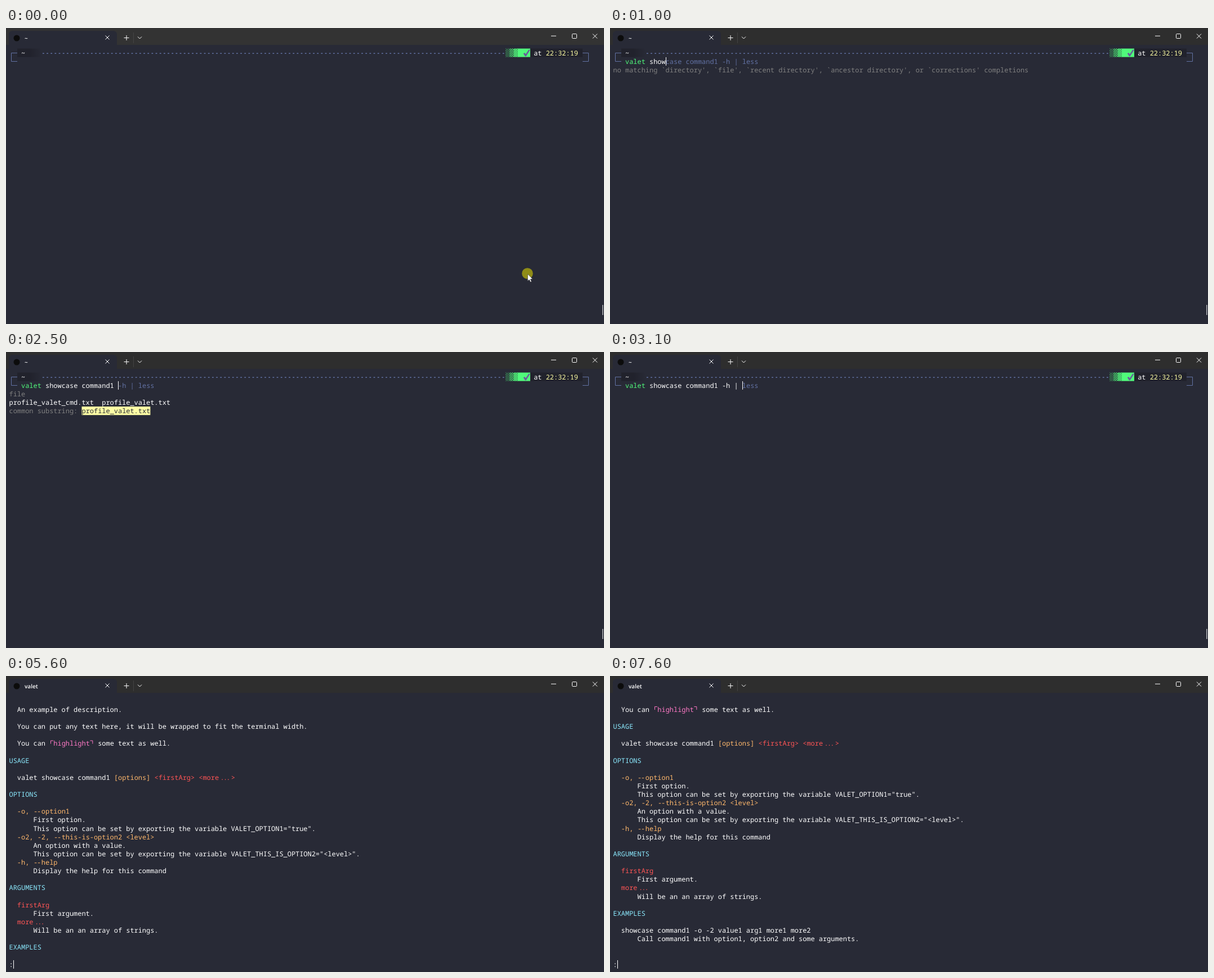
These frames come from a looping animation (1062 by 527 pixels, 8 s). An HTML page:

```html
<!DOCTYPE html>
<html lang="en">
<head>
<meta charset="utf-8">
<title>Terminal help pager</title>
<style>
html, body { margin: 0; width: 100%; height: 100%; overflow: hidden; background: #282a36; }
svg { display: block; width: 100%; height: 100%; }
text { white-space: pre; text-rendering: geometricPrecision; }
.mono { font: 11.945px "Noto Sans Mono", "DejaVu Sans Mono", monospace; }
.title { font: 600 10px "Open Sans", "Noto Sans", sans-serif; }
.icon { fill: none; stroke: #fff; stroke-width: 1; }
.frame { fill: none; stroke: #6272a4; stroke-width: 1; }
</style>
</head>
<body>
<svg viewBox="0 0 1062 527">
  <defs>
    <linearGradient id="fade">
      <stop offset="0" stop-color="#21222c"/>
      <stop offset="1" stop-color="#21222c" stop-opacity="0"/>
    </linearGradient>
    <pattern id="light" width="3.6" height="3.8" patternUnits="userSpaceOnUse">
      <path d="M0 0h1.3v1.3h-1.3zM1.8 1.9h1.3v1.3h-1.3z" fill="#50fa7b"/>
    </pattern>
    <pattern id="medium" width="3.6" height="3.8" patternUnits="userSpaceOnUse">
      <path d="M0 0h1.8v1.9h-1.8zM1.8 1.9h1.8v1.9h-1.8z" fill="#50fa7b"/>
    </pattern>
    <pattern id="dense" width="3.6" height="3.8" patternUnits="userSpaceOnUse">
      <path d="M0 0h3.6v3.8h-3.6z" fill="#50fa7b"/>
      <path d="M0 0h1.2v1.2h-1.2zM1.8 1.9h1.2v1.2h-1.2z" fill="#282a36"/>
    </pattern>
  </defs>

  <rect width="1062" height="527" fill="#282a36"/>
  <rect id="bar" width="1062" height="30"/>
  <path d="M5 30V12Q5 5 12 5H190Q197 5 197 12V30Z" fill="#282a36"/>
  <circle cx="19" cy="18" r="5.5" fill="#0c0c0c"/>
  <text id="title" class="title" x="33" y="21.5" fill="#fff"></text>
  <path class="icon" d="M176.5 13.5l7 7m0-7l-7 7M209.5 17.5h9m-4.5-4.5v9M234 15.5l3.5 3.5 3.5-3.5"/>
  <path class="icon" d="M968 14.2h9M1042 10.5l8 8m0-8l-8 8"/>
  <rect class="icon" x="1005.5" y="10.5" width="8" height="8" rx="1"/>
  <path d="M226.5 8v19" stroke="#444"/>

  <g id="shell">
    <path class="frame" d="M20 44.5H9.5V59.5H20M1024 44.5H1034.5V59.5H1024"/>
    <rect x="20" y="36.6" width="22" height="15.1" fill="#21222c"/>
    <rect x="42" y="36.6" width="22" height="15.1" fill="url(#fade)"/>
    <path d="M65 45.2H886" stroke="#6272a4" stroke-width="1.4" stroke-dasharray="2.7 4.467"/>
    <rect x="887" y="36.6" width="7.2" height="15.1" fill="url(#light)"/>
    <rect x="894.2" y="36.6" width="7.2" height="15.1" fill="url(#medium)"/>
    <rect x="901.4" y="36.6" width="7.2" height="15.1" fill="url(#dense)"/>
    <rect x="908.5" y="36.6" width="22.5" height="15.1" fill="#50fa7b"/>
    <path d="M918.8 45.4l2.2-1.4 2 2.4 5.2-7.6 2.8-.4-7.4 12-1.6.2z" fill="#6a5a9c"/>
    <rect x="931" y="36.6" width="93" height="15.1" fill="#21222c"/>
    <rect x="1059" y="493" width="1.5" height="18" fill="#b4b5ba"/>
    <g id="prompt" class="mono"></g>
  </g>
  <g id="screen" class="mono"></g>
  <rect id="caret" width="1" height="15" fill="#fff"/>
  <g id="mouse">
    <circle cx="926" cy="437" r="9.8" fill="#8f8c17"/>
    <path d="M926.5 438v12.5l2.8-2.6 2 4.4 2-.9-2-4.3h3.9z" fill="#fff" stroke="#222" stroke-width=".5"/>
  </g>
</svg>
<script>
const LOOP = 8000, CELL = 7.167, LINE = 15.13, LEFT = 5.5, TOP = 37;
const COLORS = {
  w: '#ffffff', c: '#8be9fd', o: '#ffb86c', r: '#ff5555', p: '#ff79c6',
  g: '#50fa7b', s: '#6272a4', d: '#808080', y: '#ffffa5', k: '#282a36'
};
const COMMAND = 'valet showcase command1 -h | less';
const NO_MATCH = ["^dno matching `directory', `file', `recent directory', `ancestor directory', or `corrections' completions"];
const FILES = ['^dfile', 'profile_valet_cmd.txt  profile_valet.txt', '^dcommon substring: ^kprofile_valet.txt'];
const ONE_FILE = ['^dfile', 'profile_valet_cmd.txt'];

// A caret and a letter switch the colour for the text that follows.
const HELP = `^cABOUT

  An example of description.

  You can put any text here, it will be wrapped to fit the terminal width.

  You can ^p⌜highlight⌝^w some text as well.

^cUSAGE

  valet showcase command1 ^o[options] ^r<firstArg> <more...>

^cOPTIONS

  ^o-o, --option1
      First option.
      This option can be set by exporting the variable VALET_OPTION1="true".
  ^o-o2, -2, --this-is-option2 <level>
      An option with a value.
      This option can be set by exporting the variable VALET_THIS_IS_OPTION2="<level>".
  ^o-h, --help
      Display the help for this command

^cARGUMENTS

  ^rfirstArg
      First argument.
  ^rmore...
      Will be an an array of strings.

^cEXAMPLES

  showcase command1 -o -2 value1 arg1 more1 more2
      Call command1 with option1, option2 and some arguments.`.split('\n');

const el = id => document.getElementById(id);
const colX = col => LEFT + col * CELL;
const rowY = row => TOP + row * LINE;
const escapeText = s => s.replace(/&/g, '&amp;').replace(/</g, '&lt;');

function glyphs(text, col, row, color) {
  const x = colX(col), y = rowY(row), base = y + 11.6;
  if (text === '⌜' || text === '⌝') {
    const d = text === '⌜' ? `M${x + 2.3} ${y + 8}v-5.5h4.5` : `M${x + .5} ${y + 2.5}h4.5v5.5`;
    return `<path d="${d}" fill="none" stroke="${color}"/>`;
  }
  // Ligatures sit closer together than single cells.
  const [shift, spacing] = text === '--' ? [0.6, -1.2] : text === '...' ? [2.4, -1.8] : [0, 0];
  return `<text x="${x + shift}" y="${base}" fill="${color}" letter-spacing="${spacing}">${escapeText(text)}</text>`;
}

function drawLine(source, row, col = 0) {
  let out = '', key = 'w';
  for (const part of source.split(/(\^[a-z])/)) {
    if (/^\^[a-z]$/.test(part)) { key = part[1]; continue; }
    if (key === 'k' && part) {
      out += `<rect x="${colX(col)}" y="${rowY(row) - .4}" width="${part.length * CELL}" height="${LINE}" fill="${COLORS.y}"/>`;
    }
    for (const piece of part.split(/(--|\.\.\.|[⌜⌝])/)) {
      if (piece.trim()) out += glyphs(piece, col, row, COLORS[key]);
      col += piece.length;
    }
  }
  return out;
}

const drawLines = (lines, row) => lines.map((line, i) => drawLine(line, row + i)).join('');

// One key per 100 ms, with two short pauses.
function typedCount(t) {
  const tick = Math.floor(t / 100);
  return tick - (tick >= 23) - (tick >= 29);
}

function commandLine(n) {
  if (!n) return '';
  const typed = COMMAND.slice(0, n);
  const first = typed.slice(0, 5), tail = typed.slice(29);
  return (n < 5 ? '^r' : '^g') + first + '^w' + typed.slice(5, 29) +
    (tail === 'less' ? '^g' : '^r') + tail + '^s' + COMMAND.slice(n);
}

function completions(n) {
  if (n < 6 || n > 27) return [];
  if ([6, 15, 24, 27].includes(n)) return FILES;
  return n > 15 && n < 19 ? ONE_FILE : NO_MATCH;
}

function placeCaret(col, row, visible) {
  const caret = el('caret');
  caret.setAttribute('x', Math.round(colX(col)));
  caret.setAttribute('y', Math.round(rowY(row)));
  caret.style.display = visible ? '' : 'none';
}

function show(paging, state) {
  const idle = !paging && state === 0;
  el('shell').style.display = paging ? 'none' : '';
  el('mouse').style.display = idle ? '' : 'none';
  el('bar').setAttribute('fill', idle ? '#333333' : '#2e2e2e');
  el('title').textContent = paging ? 'valet' : '~';
  if (paging) {
    el('screen').innerHTML = drawLines(HELP.slice(state, state + 31), 0) + drawLine(':', 31);
    placeCaret(1, 31, state > 0);
  } else {
    el('screen').innerHTML = drawLine(commandLine(state), 1, 3) + drawLines(completions(state), 2);
    placeCaret(3 + state, 1, state > 0);
  }
}

let last = '';
function update(now) {
  const t = now % LOOP;
  const paging = t >= 3600;
  const state = paging ? Math.max(0, Math.floor((t - 5100) / 500)) : typedCount(t);
  const key = paging + ':' + state;
  if (key !== last) show(paging, state);
  last = key;
  requestAnimationFrame(update);
}

el('prompt').innerHTML = drawLine('~', 0, 3) + drawLine('at ^y22:32:19', 0, 130);
requestAnimationFrame(update);
</script>
</body>
</html>
```
